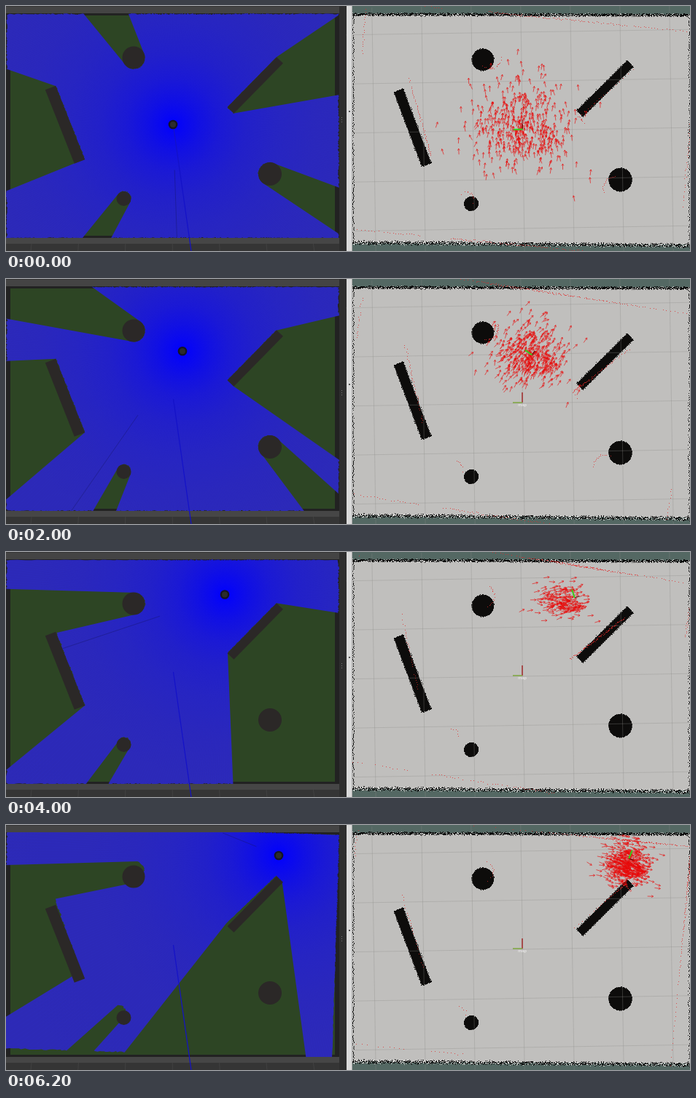
An HTML page with a canvas for the animation above (6400 ms loop, 938 by 337 pixels).

```html
<!DOCTYPE html>
<html lang="en">
<head>
<meta charset="utf-8">
<title>Robot localisation</title>
<style>
html, body { margin: 0; width: 100%; height: 100%; overflow: hidden; background: #343434; }
canvas { display: block; }
</style>
</head>
<body>
<canvas id="stage" width="938" height="337"></canvas>
<script>
const W = 938, H = 337, LOOP = 6400, STEP = 200, RAYS = 1080;
const TAU = Math.PI * 2, DEG = Math.PI / 180;
const g = document.getElementById('stage').getContext('2d');

const room = { l: 1, t: 11, r: 456, b: 319 };
const discs = [[175, 71, 15.5], [362, 231, 16], [161.5, 265, 10]];
const bars = [bar(61, 112.5, 101, 214, 15.5), bar(375.5, 74.5, 308, 143.5, 12.5)];
const mapDiscs = [[654, 74, 15], [842.5, 239, 16], [638, 272, 9.5]];
const mapBars = [bar(538.5, 117, 576.5, 218, 13.5), bar(855.5, 80, 787.5, 147.5, 12)];
const sides = b => b.map((p, i) => [p, b[(i + 1) % 4]]);
const edges = bars.flatMap(sides);

// Robot x along the drive, as [time, x]
const drive = [[0, 229], [1400, 235], [2000, 242], [2800, 260], [4000, 300], [5000, 330], [6200, 374]];

// Four corners of a bar from its centre line and width
function bar(x1, y1, x2, y2, w) {
  const k = w / 2 / Math.hypot(x2 - x1, y2 - y1), nx = (y2 - y1) * k, ny = (x1 - x2) * k;
  return [[x1 - nx, y1 - ny], [x1 + nx, y1 + ny], [x2 + nx, y2 + ny], [x2 - nx, y2 - ny]];
}

function seeded(s) {
  return () => {
    s = s + 0x6D2B79F5 | 0;
    let t = Math.imul(s ^ s >>> 15, 1 | s);
    t = t + Math.imul(t ^ t >>> 7, 61 | t) ^ t;
    return ((t ^ t >>> 14) >>> 0) / 4294967296;
  };
}

function rect(c, color, x, y, w, h) {
  c.fillStyle = color;
  c.fillRect(x, y, w, h);
}

function poly(c, pts, color) {
  c.beginPath();
  pts.forEach(p => c.lineTo(p[0], p[1]));
  c.closePath();
  c.fillStyle = color;
  c.fill();
}

function disc(c, x, y, r, color) {
  c.beginPath();
  c.arc(x, y, r, 0, TAU);
  c.fillStyle = color;
  c.fill();
}

function line(c, color, width, x1, y1, x2, y2) {
  c.strokeStyle = color;
  c.lineWidth = width;
  c.beginPath();
  c.moveTo(x1, y1);
  c.lineTo(x2, y2);
  c.stroke();
}

function layer(draw) {
  const cv = document.createElement('canvas');
  cv.width = W;
  cv.height = H;
  draw(cv.getContext('2d'));
  return cv;
}

const ground = layer(c => {
  rect(c, '#353535', 0, 0, 467, H);
  rect(c, '#444444', 0, 1, 457, 9);
  rect(c, '#222222', 0, 10, 457, 309);
  rect(c, '#2d4524', 6, 13, 445, 303);
  rect(c, '#464646', 0, 319, 457, 8);
  for (let i = 0; i < 8; i++) line(c, '#414141', 1, 35 + i * 64.4, 327, 34 + i * 64.8, H);
  rect(c, '#2e2e2e', 457, 0, 10, H);
  for (let y = 153; y < 162; y += 3) rect(c, '#777777', 460, y, 1, 1);
});

const map = layer(c => {
  const rnd = seeded(7), ink = '#0d0c0b';
  const speck = (x, y, color) => rect(c, color, Math.round(x), Math.round(y), 1, 1);
  rect(c, '#546863', 467, 0, 471, H);
  poly(c, [[475, 11], [938, 13], [938, 328], [475, 325]], '#c0bfbd');
  for (let x = 475; x < W; x++) {
    const top = 11 + (x - 475) / 400, low = 325 + (x - 475) / 115;
    for (let i = 0; i < 5; i++) {
      speck(x, top + (rnd() + rnd() - 1) * 2.6, rnd() < .82 ? '#080808' : '#d5d5d3');
      speck(x, low + (rnd() + rnd() - 1) * 3.3, rnd() < .66 ? '#080808' : '#dededc');
    }
  }
  for (let y = 12; y < 327; y++) {
    if (rnd() < .75) speck(475 + rnd() * 2, y, '#151515');
    if (rnd() < .6) speck(935 + rnd() * 3, y, '#151515');
  }
  mapBars.forEach(b => {
    poly(c, b, ink);
    sides(b).forEach(([p, q]) => {
      for (let k = 0; k < 1; k += .015) {
        speck(p[0] + (q[0] - p[0]) * k + rnd() * 2 - 1.5, p[1] + (q[1] - p[1]) * k + rnd() * 2 - 1.5, ink);
      }
    });
  });
  mapDiscs.forEach(([x, y, r]) => {
    disc(c, x, y, r, ink);
    for (let a = 0; a < TAU; a += .09) {
      const q = r - .5 + rnd();
      speck(x + q * Math.cos(a) - .5, y + q * Math.sin(a) - .5, ink);
    }
  });
  c.save();
  c.translate(708.5, 171);
  c.rotate(-.016);
  for (let i = -3; i < 4; i++) {
    line(c, 'rgba(140,140,138,.33)', 1, i * 68, -172, i * 68, 170);
    line(c, 'rgba(140,140,138,.33)', 1, -240, i * 67.5, 240, i * 67.5);
  }
  c.restore();
  rect(c, '#dadada', 467, 0, 7, H);
  rect(c, '#a8a8a8', 474, 0, 1, H);
  rect(c, '#555555', 470, 144, 2, 2);
});

// Distance from (x, y) to the first obstacle or wall
function cast(x, y, a) {
  const dx = Math.cos(a), dy = Math.sin(a);
  let best = Math.min(
    ((dx > 0 ? room.r : room.l) - x) / dx,
    ((dy > 0 ? room.b : room.t) - y) / dy);
  for (const [cx, cy, r] of discs) {
    const along = (cx - x) * dx + (cy - y) * dy;
    const off = (cx - x) * dy - (cy - y) * dx;
    if (along > 0 && Math.abs(off) < r) best = Math.min(best, along - Math.sqrt(r * r - off * off));
  }
  for (const [p, q] of edges) {
    const ex = q[0] - p[0], ey = q[1] - p[1], px = p[0] - x, py = p[1] - y;
    const det = dx * ey - dy * ex;
    const d = (px * ey - py * ex) / det, k = (px * dy - py * dx) / det;
    if (d > 0 && k >= 0 && k <= 1) best = Math.min(best, d);
  }
  return best;
}

function driveX(t) {
  const i = Math.max(1, drive.findIndex(p => p[0] >= t));
  const [t0, x0] = drive[i - 1], [t1, x1] = drive[i];
  return x0 + (x1 - x0) * (t - t0) / (t1 - t0);
}

const rnd = seeded(21);
const gauss = () => Math.sqrt(-2 * Math.log(1 - rnd())) * Math.cos(TAU * rnd());
const cloud = Array.from({ length: 430 }, () => [gauss(), gauss(), gauss() * 13]);
const jitter = Array.from({ length: RAYS }, () => rnd() * 2 - 1);

function drawScene(x, y, rays, heading, twist) {
  g.drawImage(ground, 0, 0);
  g.save();
  g.beginPath();
  g.rect(0, 10, 457, 309);
  g.clip();
  const hits = rays.map((r, i) => {
    const a = r.a + twist, d = r.d + jitter[i] * 1.2;
    return [x + d * Math.cos(a), y + d * Math.sin(a)];
  });
  const blue = g.createRadialGradient(x, y, 0, x, y, 400);
  const haze = g.createRadialGradient(x, y, 30, x, y, 150);
  for (let i = 0; i <= 10; i++) {
    const k = i * i / 100, f = 1 - Math.exp(-k * 400 / 75);
    blue.addColorStop(k, `rgb(${45 * f},${42 * f},${255 - 73 * f})`);
  }
  haze.addColorStop(0, 'rgba(45,45,205,0)');
  haze.addColorStop(1, 'rgba(45,45,205,.25)');
  poly(g, hits, blue);
  g.beginPath();
  for (let i = 0; i < RAYS; i += 2) {
    g.moveTo(x, y);
    g.lineTo(...hits[i]);
  }
  g.strokeStyle = haze;
  g.lineWidth = .6;
  g.stroke();

  const back = heading + Math.PI, far = cast(x, y, back);
  const c = far * Math.cos(back), s = far * Math.sin(back);
  line(g, 'rgba(22,20,95,.5)', .8, x + c * .4, y + s * .4, x + c, y + s);
  g.restore();

  bars.forEach(b => poly(g, b, '#2b2827'));
  discs.forEach(d => disc(g, ...d, '#2b2827'));
  line(g, '#1412c8', 1.2, 229.5, 165, 254, H);
  disc(g, x, y, 6.3, '#151522');
  disc(g, x, y, 4, '#2c2c2c');
}

function drawMap(x, y, rays, heading, u) {
  const rx = 478 + x * 1.006, ry = y * 1.022 + 3;
  g.drawImage(map, 0, 0);
  g.save();
  g.beginPath();
  g.rect(475, 0, 463, H);
  g.clip();

  // Laser points, turned by the error of the estimate
  const turn = .095 + .075 * Math.sin(Math.PI * u) ** 2;
  const noise = seeded(Math.round(u * 31));
  g.fillStyle = 'rgba(226,40,40,.75)';
  rays.forEach((r, i) => {
    const n = noise() * 2 - 1, keep = noise();
    if (i % 2 || keep < .2) return;
    const a = r.a + turn, d = r.d + n * 1.3;
    g.fillRect(Math.round(rx + d * Math.cos(a) * 1.006), Math.round(ry + d * Math.sin(a) * 1.022 + 8 * u - 1), 1, 1);
  });

  line(g, '#a02a2a', 1.5, 708, 156, 708, 170);
  line(g, '#7da63c', 1.5, 695, 170, 708, 170);
  g.fillStyle = '#f4f4f4';
  g.font = '6px "Liberation Sans", Arial, sans-serif';
  g.textAlign = 'center';
  g.fillText('map', 708, 175);

  // The cloud narrows, and thins out for a while past the middle
  const thin = Math.sin(Math.PI * u ** 1.6) ** 4;
  const sx = 16 + 20 * (1 - u) ** 2, sy = sx * .88 - 4 * thin;
  const cx = rx - 15 * thin - 2 * u, cy = ry - 2 + 11 * u;
  const e = u ** .85, aim = -87 + 104 * e * e * (3 - 2 * e);
  g.beginPath();
  cloud.slice(0, 430 - 240 * thin).forEach(([p, q, w]) => {
    const a = (aim + w) * DEG, c = Math.cos(a), s = Math.sin(a);
    const px = cx + p * sx - c * 4, py = Math.max(13, cy + q * sy - s * 4);
    const tx = px + c * 8, ty = py + s * 8;
    g.moveTo(px, py);
    g.lineTo(tx, ty);
    g.moveTo(tx - c * 2.5 - s * 1.5, ty - s * 2.5 + c * 1.5);
    g.lineTo(tx, ty);
    g.lineTo(tx - c * 2.5 + s * 1.5, ty - s * 2.5 - c * 1.5);
  });
  g.strokeStyle = 'rgba(232,10,10,.85)';
  g.lineWidth = .75;
  g.stroke();

  const c = Math.cos(heading), s = Math.sin(heading);
  line(g, '#7a1515', 1.5, rx, ry, rx + 7 * c, ry + 7 * s);
  line(g, '#35d01c', 2, rx, ry, rx + 12 * s, ry - 12 * c);
  g.restore();
}

function frame(now) {
  const t = Math.floor(now % LOOP / STEP) * STEP, u = t / (LOOP - STEP);
  const x = driveX(t), y = 42 + 121 * (1 - u) ** 1.92;
  const heading = (-92 + 114 * u) * DEG;
  const twist = .032 * Math.max(0, (t - 5000) / 1200);
  const rays = Array.from({ length: RAYS }, (_, i) => {
    const a = (i + .5) / RAYS * TAU;
    return { a, d: cast(x, y, a) };
  });
  drawScene(x, y, rays, heading, twist);
  drawMap(x, y, rays, heading, u);
}

const start = performance.now();
function tick() {
  frame(performance.now() - start);
  requestAnimationFrame(tick);
}
tick();
</script>
</body>
</html>
```
